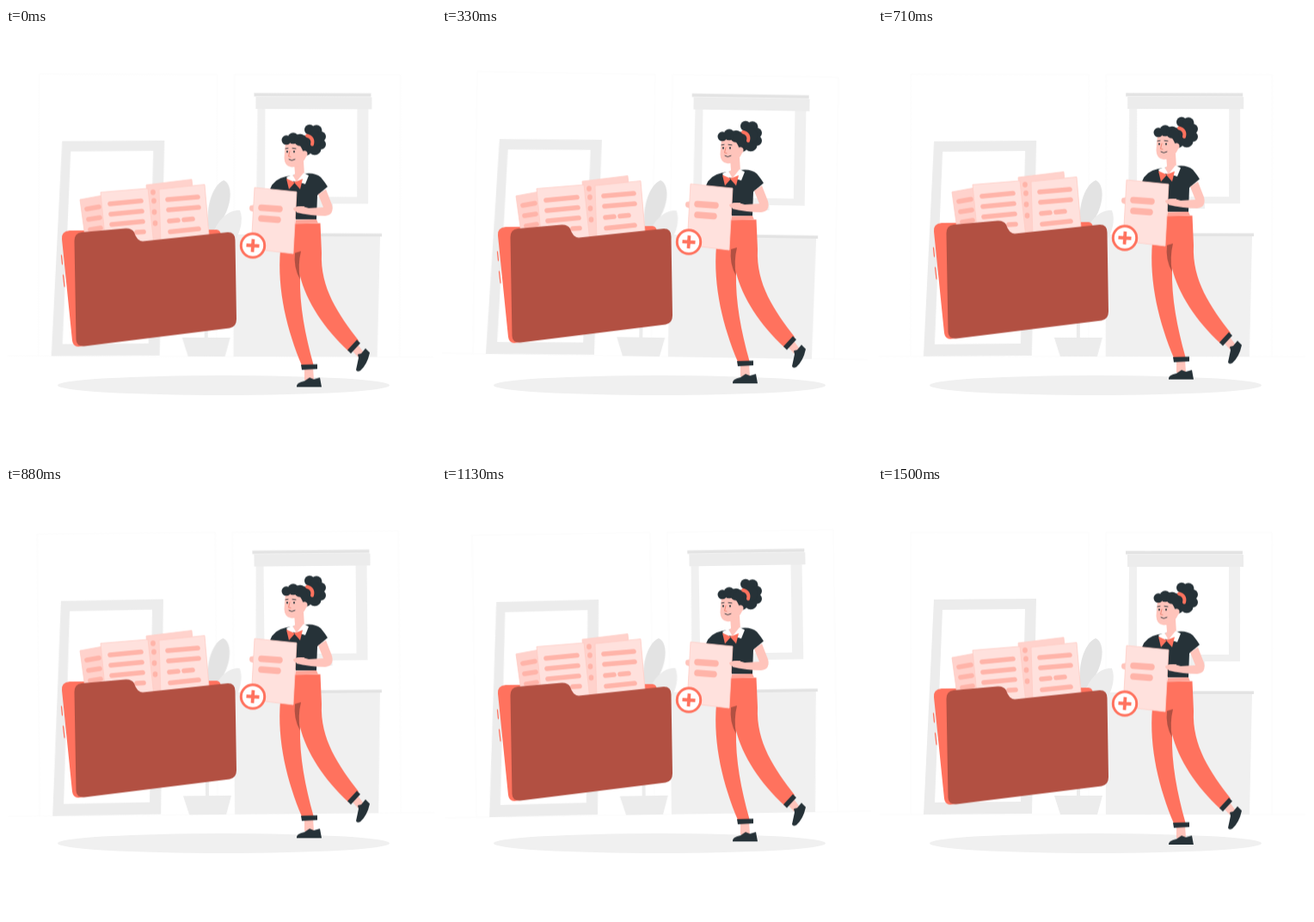
Recreate the animation shown at these times as an HTML page without scripts. Size 500x500 px, loop 1540 ms.

```html
<!DOCTYPE html>
<html lang="en">
<head>
<meta charset="utf-8">
<title>Adding a page to a folder</title>
<style>
  html, body { margin: 0; width: 100%; height: 100%; overflow: hidden; background: #fff; }
  svg { display: block; width: 100%; height: 100%; }

  .float, .sway { animation: 770ms cubic-bezier(.37, 0, .63, 1) infinite alternate; }
  .float { animation-name: float; animation-delay: -40ms; }
  .sway { animation-name: sway; animation-delay: -425ms; transform-origin: 250px 250px; }
  @keyframes float { from { transform: translateY(.5px); } to { transform: translateY(-8.4px); } }
  @keyframes sway { from { transform: rotate(-.9deg); } to { transform: rotate(.9deg); } }

  .orange { fill: #ff725e; }
  .brick { fill: #b25042; }
  .dark { fill: #263238; }
  .skin { fill: #ffc4bb; }
  .grey { fill: #ececec; }
  .pale { fill: #f0f0f0; }
  .mid { fill: #e3e3e3; }
  .white { fill: #fff; }
  .sheet { fill: #ffe1dd; stroke: #ffcdc6; stroke-width: .8; }
  .back { fill: #ffd2cc; }
  .lines { fill: none; stroke: #ffb4a9; stroke-width: 5.6; stroke-linecap: round; }
  .thick { stroke-width: 7.5; }
  .pen { fill: none; stroke-linecap: round; stroke-linejoin: round; }
</style>
</head>
<body>
<svg viewBox="0 0 500 500">
  <ellipse class="pale" cx="253" cy="415.500" rx="193" ry="11.500"/>

  <g class="sway">
    <path class="pen" stroke="#fbfbfb" d="M2 382H497M38 382V54H245V382M265 382V54H458V382"/>

    <!-- picture frame -->
    <path class="grey" fill-rule="evenodd" d="M65 132L184 131L179 381L53 382ZM75 144L66 368L166 367L171 143Z"/>

    <!-- window -->
    <path class="pale" fill-rule="evenodd" d="M292 93H421V204H380V210H291ZM301 93V196H408V93Z"/>
    <path class="grey" d="M290 80H425V94H290Z"/>
    <path class="mid" d="M288 75.500H424V79.500H288Z"/>

    <!-- cabinet -->
    <path class="pale" d="M265 240H435L432 382H265Z"/>
    <path class="mid" d="M365 238.500H437V242H365Z"/>

    <!-- plant -->
    <path class="mid" d="M236 236C231 212 239 183 253 177C265 182 264 213 241 236Z"/>
    <path class="grey" d="M240 240C247 221 260 211 272 212C276 222 273 238 266 246Z"/>
    <path class="grey" d="M231 340H235V361H231ZM205 360H261L255 382H212Z"/>
  </g>

  <g class="float">
    <!-- folder and its pages -->
    <path class="orange" d="M74 235L245 234Q250 235 250 241V345L84 370Q78 370 77 363L65 245Q64 236 74 235Z"/>
    <path class="pen" stroke="#ff725e" stroke-width="1.300" d="M64.500 264L65.500 274M66.500 287L68 300"/>
    <g class="sheet">
      <path class="back" d="M86 199L113 194L121 245L93 250Z"/>
      <path class="back" d="M163 182L216 175.500L223 245L169 250Z"/>
      <path d="M110 190.500L165 186L172 252L116 252Z"/>
      <path d="M178 187L231 181.500L236 240L180 250Z"/>
    </g>
    <g class="lines">
      <path d="M94 210L108 207.500M96 222L109 220M98 234L110 232"/>
      <path d="M171 190V191M172 200V201M172.500 213V214M173.500 226V227"/>
      <path d="M121 204L157 200.500M122 216L158 212.500M123 228L159 224.500M152 237L160 236.500"/>
      <path d="M188 199L223 196M189 211L224 208M190 224L200 223M207 222.500L217 221.500M191 236.500L224 233"/>
    </g>
    <path class="brick" d="M79.500 247Q79.500 238 88 237L139 232.500Q146 232 149 237Q152 247 159 247.500L258 237Q266.500 237 266.500 246L268 338Q268 347 260 348.500L91 369.500Q82 370 81.500 362Z"/>

    <!-- legs -->
    <path class="skin" d="M347 394H357L358 409H347ZM401 373L408 366L416 377L409 382Z"/>
    <path class="dark" d="M338 417Q337 412 347 410L353 406L358 408L365 406L367 417Z"/>
    <path class="dark" d="M407 397L410 383L409 379L413 378L418 372L423 377Q420 391 412 398Q408 400 407 397Z"/>
    <path class="orange" d="M334 227L365.500 226.500L367 261C365 302 387 333 410 363L398 375C370 349 349 317 342 288C341 322 348 357 357.500 391L344 392C327 351 315 305 319 257Z"/>
    <path class="brick" d="M336 261L343 259Q339 275 342 292Q334 278 336 261Z"/>
    <path class="dark" d="M343 391L362 390.500V396L344 397ZM397 374L408 362L412 366L401 378Z"/>

    <!-- torso and arm -->
    <path class="dark" d="M307 187Q311 175 326 172L346 169Q359 167 366 173Q371 179 374 184L362 194L361 222H337L327 203Z"/>
    <path d="M337 222.500L361 222L363 226.500L336 227.500Z" fill="#ffa497"/>
    <path class="skin" d="M363 193L372 187L379 205Q382 217 371 218Q355 218 338 214L337 208Q345 206 352 209L369 208Z"/>
    <path class="skin" d="M335 155L346 154L347 171Q342 178 337 179Q333 177 332 173L336 169Z"/>
    <path class="white" d="M333 170L326 173L329 179L337 177ZM346 168L352 171L348 181L338 178Z"/>
    <path class="orange" d="M336 179L326 174.500L329 187ZM335 179L345 175L342 187Z"/>

    <!-- head -->
    <g transform="translate(0 .8)">
      <path class="skin" d="M325 132Q324 142 323.500 150Q324 160 332 160.500Q342 161 347 152L352 143L347 128Z"/>
      <g class="dark">
        <circle cx="326" cy="129" r="5.500"/>
        <circle cx="334" cy="127" r="6.500"/>
        <circle cx="342" cy="129" r="7"/>
        <path d="M338 129Q348 119 353 128L356 142Q351 149 347 146L344 139Z"/>
        <circle cx="353" cy="117" r="6"/>
        <circle cx="361" cy="118" r="6.500"/>
        <circle cx="366" cy="125" r="6"/>
        <circle cx="366" cy="134" r="6"/>
        <circle cx="359" cy="139" r="7.500"/>
        <circle cx="358" cy="128" r="9"/>
        <ellipse cx="327" cy="142.500" rx=".9" ry="1.300"/>
        <ellipse cx="335" cy="142.500" rx=".9" ry="1.300"/>
      </g>
      <circle class="skin" cx="347" cy="145" r="3.500"/>
      <path class="pen" stroke="#ff725e" stroke-width="4" d="M350 124Q358 126 356 134"/>
      <path class="pen" stroke="#263238" stroke-width=".9" d="M325 139L328 138.500M333 138.500L337 139M329 151.500Q332 154 336 151.500"/>
      <path class="pen" stroke="#ee806f" stroke-width=".9" d="M330 142L328.500 148L331 148.500"/>
    </g>

    <!-- held page -->
    <path class="skin" d="M290 205L284 206Q282 209 284 212L290 214Z"/>
    <path class="sheet" d="M289 185L338 190L334 262L285 256Z"/>
    <path class="lines thick" d="M297 208.500L318 210M297 221L316 222.500"/>
    <path class="skin" d="M347 207L339 207L334 209Q334 212 338 213L346 215Z"/>

    <!-- plus badge -->
    <circle class="white" cx="287" cy="252.500" r="13.700" stroke="#ff725e" stroke-width="3"/>
    <path fill="none" stroke="#ff725e" stroke-width="3.800" d="M287.500 245L286.500 260M279.500 252L294.500 253"/>
  </g>
</svg>
</body>
</html>
```
